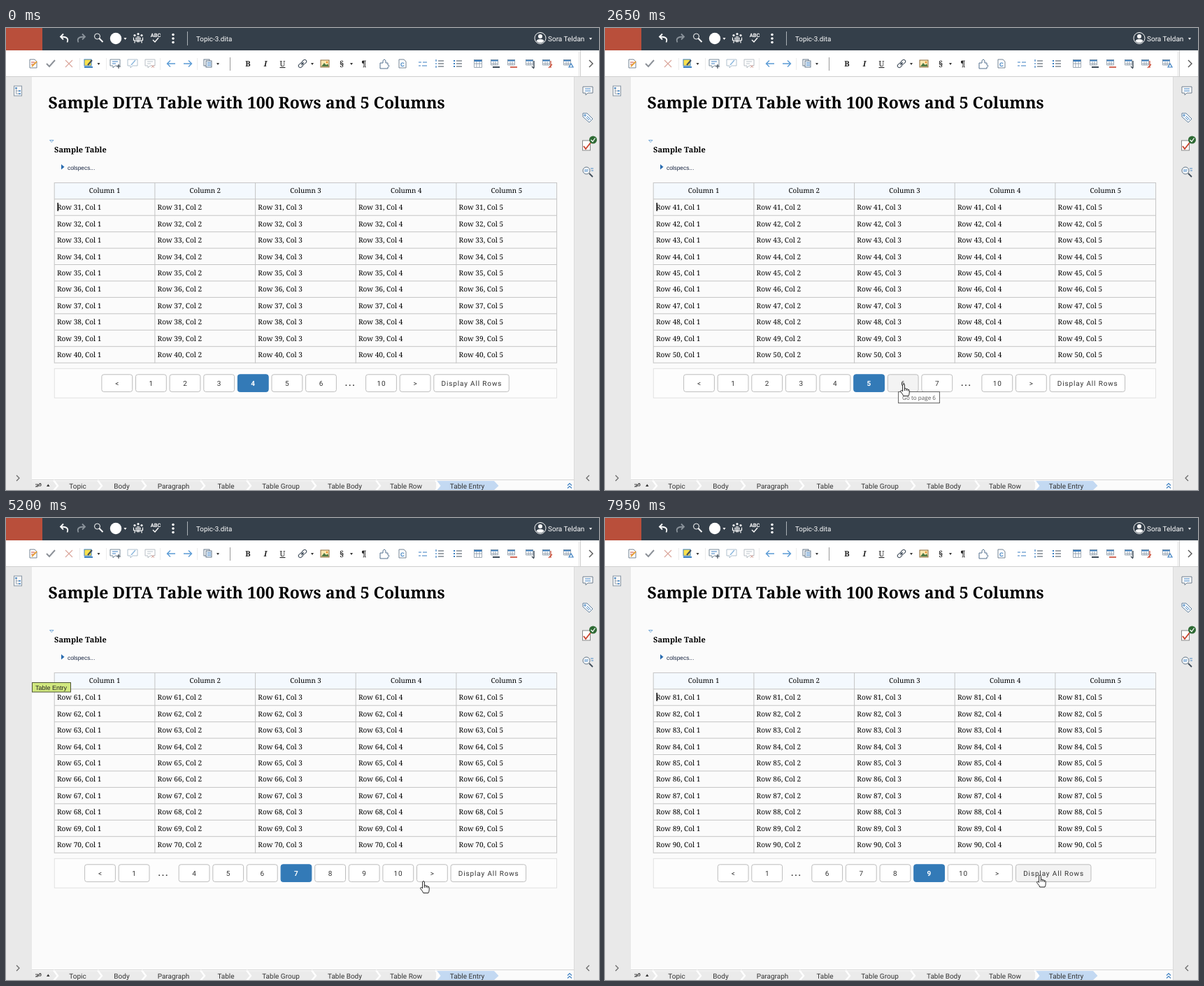
Recreate the animation shown at these times as an HTML page. Size 848 by 661 pixels, loop 8 s.

```html
<!DOCTYPE html>
<html lang="en">
<head>
<meta charset="utf-8">
<title>Paged table editor</title>
<style>
  html, body { margin: 0; width: 100%; height: 100%; overflow: hidden; background: #fbfbfb; }
  svg { display: block; width: 848px; height: 661px; }
  text { text-rendering: geometricPrecision; white-space: pre; }
  .ui { font-family: Roboto, sans-serif; font-size: 10px; }
  .serif { font-family: "Noto Serif", serif; font-size: 10.1px; }
  .arial { font-family: "Liberation Sans", sans-serif; }
  .mid { text-anchor: middle; }
  .b { font-weight: 700; }
  .btn { letter-spacing: .85px; fill: #333; }
</style>
</head>
<body>
<svg id="stage" viewBox="0 0 848 661" xmlns="http://www.w3.org/2000/svg">
  <g id="chrome"></g>
  <g id="rows" class="serif"></g>
  <path id="caret" d="M74.2 250V262" stroke="#000" stroke-width="1.4"/>
  <g id="tag">
    <rect x="37.5" y="235.5" width="55" height="13.5" fill="#d1e87f" stroke="#4d5536"/>
    <text x="42" y="245.7" class="arial" font-size="9" fill="#222">Table Entry</text>
  </g>
  <g id="pager" class="ui mid"></g>
  <g id="tip">
    <rect x=".5" y=".5" height="16" fill="#fff" stroke="#666"/>
    <text x="6" y="11.6" font-family="Open Sans, sans-serif" font-size="8.1" fill="#555"></text>
  </g>
  <circle id="halo" r="8" fill="#ecd938" fill-opacity=".78"/>
  <path id="cursor" fill="#fff" stroke="#111" stroke-width=".9" stroke-linejoin="round"/>
</svg>
<script>
const $ = id => document.getElementById(id);
const INK = '#3f4c59', BLUE = '#3b7fc1', GREY = '#c4c4c4', RED = '#c8452f';

// ---------- drawing helpers ----------
const rect = (x, y, w, h, fill, stroke = 'none', r = 0) =>
  `<rect x="${x}" y="${y}" width="${w}" height="${h}" rx="${r}" fill="${fill}" stroke="${stroke}"/>`;
const line = (d, stroke = INK, w = 1, fill = 'none') =>
  `<path d="${d}" fill="${fill}" stroke="${stroke}" stroke-width="${w}"/>`;
const solid = (d, fill = INK) => `<path d="${d}" fill="${fill}"/>`;
const disc = (x, y, r, fill, stroke = 'none') =>
  `<circle cx="${x}" cy="${y}" r="${r}" fill="${fill}" stroke="${stroke}"/>`;
const text = (x, y, s, cls = 'ui', attrs = '') =>
  `<text x="${x}" y="${y}" class="${cls}" ${attrs}>${s}</text>`;
const at = (x, y, body) => `<g transform="translate(${x} ${y})">${body}</g>`;
const drop = (x, y, fill) => solid(`M${x - 2} ${y - 1}h4l-2 3z`, fill);

// ---------- top bar ----------
function topBar() {
  const w = '#fff', undo = c => line('M4.500 6Q8-2-4-2M-1-6L-5-2L-1 2', c, 1.8);
  return rect(0, 0, 848, 32, '#343f4a') + rect(0, 0, 52, 32, '#b94f3b')
    + at(83, 14.5, undo(w))
    + `<g transform="translate(108 14.5) scale(-1 1)">${undo('#8a939b')}</g>`
    + at(132, 14, disc(-1.5, -2, 4, 'none', w) + line('M1.500 1L6.500 6', w, 2))
    + disc(157, 15, 8.2, w) + drop(170.5, 15, w)
    + at(189, 14.5, [-5, 0, 5].map(x => disc(x, x ? -4 : -6, 1.6, w)).join('')
      + line('M-6.500-1V3H-5V7M6.500-1V3H5V7M-3-1V3M3-1V3M-1-3V6M1-3V6M-4 4H4', w, 1.2))
    + text(214, 13, 'ABC', 'ui mid b', 'fill="#fff" style="font-size:7.5px"')
    + line('M210 17L213 20L218 14', w, 1.4)
    + [9.5, 15, 20.5].map(y => disc(239, y, 1.8, w)).join('')
    + line('M259.500 5V25', '#aab1b7')
    + text(272, 18.7, 'Topic-3.dita', 'ui', 'fill="#fff" style="font-size:9.8px"')
    + disc(764, 14.5, 8, 'none', w) + disc(764, 12, 3, w)
    + solid('M758.500 19Q759 16 764 16T769.500 19Q764 23.500 758.500 19', w)
    + text(775, 18.5, 'Sora Teldan', 'ui', 'fill="#fff"') + drop(836, 15, w);
}

// ---------- toolbar icons, each centred on 0,0 ----------
const bubble = (mark, c) => line('M-7-6H7V3H0L-3 6V3H-7Z', c, .9, '#fff') + mark;
const arrow = line('M6 0H-5M-1-4.500L-5.500 0L-1 4.500', '#5b9bd5', 1.4);
const pen = line('M-2 4L5-3', '#e7a13a', 2);
const sheet = line('M-5-6H2L5-3V6H-5Z', '#66788a', .9, '#fff');
const bars = line('M-2-4H6M-2 0H6M-2 4H6', INK, 1);
const table = solid('M-6-6H6V-3H-6Z', BLUE) + line('M-5.500-5.500H5.500V5.500H-5.500ZM-5.500 0H5.500M-2-3V5M2-3V5', '#8796a4', .8);
const smallTable = mark => solid('M-7-6H4V-3.500H-7Z', BLUE)
  + line('M-6.500-5.500H3.500V2H-6.500ZM-3-3V2M0-3V2M-6 0H3', '#8796a4', .8) + mark;

function toolBar() {
  const icons = [
    [39, sheet + line('M-3-2H2M-3 1H1', RED) + pen],
    [64, line('M-6 0L-2 4L6-5', '#8d9299', 2)],
    [90, line('M-5-5L5 5M5-5L-5 5', '#dba79d', 1.2)],
    [118, rect(-6, -6, 10, 9, '#fbe14c', BLUE) + line('M-1 2L5-5', INK, 2) + rect(-6, 4, 12, 2, BLUE)],
    [156, bubble(line('M-4-3H4M-4 0H1', BLUE) + line('M2 4H8M5 1V7', INK, 1.2), '#6d7f90')],
    [181, bubble(line('M-2 2L4-5', '#8eb9df', 1.5), '#a9bac9')],
    [206, bubble(line('M-4-3H4M-4 0H1', '#b9c2ca') + line('M2 2L6 6M6 2L2 6', '#dba79d'), '#b0b8c0')],
    [236, arrow], [260, `<g transform="scale(-1 1)">${arrow}</g>`],
    [289, rect(-6, -6, 8, 9, '#fff', '#66788a') + rect(-3, -4, 8, 9, '#e4eef8', '#66788a') + line('M-1-1H4M-1 2H4', BLUE)],
    [424, `<g transform="rotate(-45)">${rect(-7, -2.5, 7, 5, 'none', INK, 2.5) + rect(0, -2.5, 7, 5, 'none', INK, 2.5) + line('M-3 0H3')}</g>`],
    [456, rect(-6, -5, 12, 10, '#f9e7b0', '#8b6b3d') + solid('M-5 4L-1-1L2 2L4 0L5.500 4Z', '#4d7a45') + disc(3, -2, 1.3, '#e88a2a')],
    [541, line('M-6-1H-2V-4Q0-8 2-4V-1H5V2Q9 3 5 5V7H-6Z', '#526f8d', 1, '#fff')],
    [567, sheet + text(0, 4, 'C', 'arial mid b', `font-size="8" fill="${BLUE}"`)],
    [596, line('M-6-2H-2M0-2H6M-6 3H-3M-1 3H6', BLUE, 1.2)],
    [620, bars + line('M-5-6V-3M-5-1V1M-5 3V6', BLUE, 1.2)],
    [646, bars + [-4, 0, 4].map(y => rect(-6, y - 1, 2, 2, BLUE)).join('')],
    [675, table],
    [700, smallTable(line('M-4 5H6', INK, 2))],
    [724, smallTable(line('M-3 5H7', RED, 1.6))],
    [750, smallTable(line('M5-4V6M2 4L5 7', INK, 1.4))],
    [774, smallTable(line('M5-4V6M2 6L7 1', RED, 1.2))],
    [804, smallTable(line('M1 5L4 0L7 5Z', BLUE, 1.2, '#fff'))]
  ];
  const glyph = (x, s, extra = '') => text(x, 55, s, 'serif mid b', 'fill="#222" style="font-size:11px;' + extra + '"');
  return rect(0, 32, 848, 37.5, '#fff') + line('M0 69.500H848', '#cfcfcf')
    + icons.map(([x, body]) => at(x, 51, body)).join('')
    + glyph(346, 'B') + glyph(371, 'I', 'font-style:italic') + glyph(395.5, 'U', 'font-weight:400;text-decoration:underline')
    + glyph(480, '§') + glyph(512, '¶')
    + [132.5, 303, 438, 494].map(x => drop(x, 51, '#333')).join('')
    + [105, 143, 220, 273].map(x => line(`M${x}.5 43V60`, '#ececec')).join('')
    + line('M320.500 42V61', '#999')
    + solid('M818 33H822V69H818Z', '#f2f2f2') + line('M821.500 32V69', '#d2d2d2')
    + line('M834 46L839 51L834 56', '#555', 1.4);
}

// ---------- side panels and breadcrumb ----------
function sides() {
  const chevron = (x, s) => line(`M${x - 2 * s} 640L${x + 2 * s} 644L${x - 2 * s} 648`, '#666', 1.2);
  return rect(0, 70, 37, 591, '#e9e9e9') + rect(812, 70, 36, 591, '#e9e9e9') + line('M812.500 70V661', '#dadada')
    + at(17, 90, rect(-5.5, -7, 11, 14, '#f7f7f7', '#8796a4')
      + line('M-2.500-5V4H1M-2.500 0H1', '#8796a4', .8) + line('M-4-4H-1M1 0H4M1 4H4', BLUE, 1.6))
    + at(832, 90, bubble(line('M-4-3H4M-4 0H4', BLUE), '#5f7182'))
    + at(832, 128, line('M-7-6H-1L7 2L2 7L-7-1Z', '#5f7f9f', 1, '#fff') + disc(-4, -3, 1.2, 'none', BLUE) + line('M-1-2L4 3M-2 0L2 4', BLUE))
    + at(830, 168, rect(-5.5, -7, 11, 14, '#fff', '#888') + line('M-4 1L-1 5L6-4', RED, 1.8))
    + disc(839.5, 160, 5.5, '#2f6b35') + line('M836.500 160L839 162.500L842.500 157.500', '#fff', 1.3)
    + at(831, 205, disc(-1, -1, 5, '#fff', '#5f7182') + line('M3 3L8 8', INK, 1.8) + line('M-4-2H2M-4 0H1M5-4H9M6-1H9', BLUE, .9))
    + chevron(17, 1) + chevron(832, -1);
}

function crumbs() {
  const names = [['Topic', 102.5], ['Body', 165.5], ['Paragraph', 239.5], ['Table', 314.5],
    ['Table Group', 393], ['Table Body', 484.5], ['Table Row', 572], ['Table Entry', 659.5]];
  return rect(37, 646, 775, 15, '#fbfbfb') + line('M37 646.500H812', '#d5d5d5')
    + rect(37, 648, 578, 13, '#ebebeb')
    + solid('M614 648H698L704.500 655L698 661H614L620.500 655Z', '#c3d9f2')
    + [68, 131, 194, 278, 344, 437, 529, 614].map(x => line(`M${x} 647L${x + 6} 655L${x} 662`, '#fff', 2.4)).join('')
    + line('M42 656.500L50 651.500M42 653H46V656H43M47 652H50V655H47', '#444', 1)
    + solid('M58 656H62.500L60.300 652.500Z', '#333')
    + names.map(([s, x]) => text(x, 658.5, s, 'ui mid', 'fill="#333"')).join('')
    + line('M803 654.500L806 651.500L809 654.500M803 658.500L806 655.500L809 658.500', BLUE, 1.1);
}

// ---------- document ----------
const LEFT = 69.2, COL = 143.68, BODY = 244.8, ROW = 23.43;
function sheetArea() {
  const right = LEFT + COL * 5;
  let s = text(60.5, 115, 'Sample DITA Table with 100 Rows and 5 Columns', 'serif b', 'style="font-size:23px"')
    + line('M62.500 160.500H68L65.200 163.500Z', '#77a9d6', 1, '#fff')
    + text(69, 178, 'Sample Table', 'serif b', 'style="font-size:11px"')
    + solid('M79 195L83.500 198.700L79 202.500Z', '#2a6cb0')
    + text(88, 202.7, 'colspecs...', 'arial', 'font-size="8.3" fill="#16233f"')
    + rect(LEFT, 221.5, COL * 5, 23.3, '#f4f9fe');
  let grid = '';
  for (let i = -1; i <= 10; i++) grid += `M${LEFT} ${(BODY + i * ROW).toFixed(1)}H${right}`;
  for (let c = 0; c <= 5; c++) grid += `M${(LEFT + c * COL).toFixed(1)} 221V479.500`;
  s += line(grid, GREY);
  for (let c = 0; c < 5; c++) s += text(LEFT + COL * (c + .5) + .1, 236.3, 'Column ' + (c + 1), 'serif mid', 'style="font-size:9.8px"');
  return s + rect(69.3, 487.3, 718.2, 41.9, '#fdfdfd', '#e1e1e1');
}

$('chrome').innerHTML = rect(0, 0, 848, 661, '#fbfbfb') + sheetArea() + sides() + crumbs() + topBar() + toolBar();

function drawRows(page) {
  let s = '';
  for (let r = 0; r < 10; r++)
    for (let c = 0; c < 5; c++)
      s += text((LEFT + 3.7 + c * COL).toFixed(1), (260.2 + r * ROW).toFixed(1),
        `Row ${(page - 1) * 10 + r + 1}, Col ${c + 1}`, '');
  $('rows').innerHTML = s;
}

// ---------- pager ----------
const STEP = 48.6, GAP = 37.4, WIDE = 108.5;
function layout(page) {
  const items = ['&lt;'];
  let last = 0;
  for (let n = 1; n <= 10; n++) {
    if (n > 1 && n < 10 && (n < page - 3 || n > page + 2)) continue;
    if (n - last > 1) items.push('...');
    items.push(n);
    last = n;
  }
  items.push('&gt;', 'Display All Rows');
  const size = k => k === '...' ? GAP : k === 'Display All Rows' ? WIDE : STEP;
  let x = 428.1 - items.reduce((sum, k) => sum + size(k), 0) / 2;
  return items.map(key => {
    const w = size(key), box = { key, x, w: w === STEP ? 44.8 : w };
    x += w;
    return box;
  });
}

const hit = (boxes, x, y) => y < 496 || y > 519 ? null
  : boxes.find(b => b.key !== '...' && x >= b.x && x <= b.x + b.w);

function drawPager(boxes, page, hover, pressed) {
  $('pager').innerHTML = boxes.map(b => {
    if (b.key === '...')
      return text(b.x + 16, 512, '...', 'b', 'fill="#333" style="font-size:12px;letter-spacing:1.8px"');
    const on = b.key === page, over = hover === b;
    let fill = '#fff', edge = '#bdbdbd';
    if (on) fill = edge = over ? '#286090' : '#337ab7';
    else if (over && pressed) { fill = '#c2dcf3'; edge = '#3c80c2'; }
    else if (over) fill = '#f3f3f3';
    return rect((b.x + .5).toFixed(1), 495.8, (b.w - 1).toFixed(1), 24.6, fill, edge, 3)
      + text((b.x + b.w / 2 + .4).toFixed(1), 511.7, b.key, on ? 'btn b' : 'btn', on ? 'style="fill:#fff"' : '');
  }).join('');
}

// ---------- timeline ----------
const LOOP = 8000;
const turns = [[0, 4], [1560, 5], [2910, 6], [4340, 7], [5590, 8], [6910, 9]];
const presses = [[1500, 1560], [2850, 2910], [4280, 4340], [5530, 5590], [6850, 6910]];
const tags = [[1630, 2630], [3010, 4030], [4500, 5510], [5710, 6700], [7030, 7950]];
const caretOff = [[260, 1560], [2090, 2610], [3510, 4030], [4840, 5360], [6110, 6640], [7430, 7950]];
const tips = [[2600, 2850, 'Go to page 6', 59], [3690, 4280, 'Go to page 7', 59], [6110, 6850, 'Go to next page', 73]];
const path = [[400, 513, 41], [550, 379, 521.5], [800, 379, 521.5], [930, 371, 513], [1160, 406, 510],
  [1910, 406, 510], [2090, 427, 510], [3510, 427, 510], [3690, 440, 510], [4810, 440, 510],
  [5200, 597, 520], [5400, 604, 510], [7370, 604, 510], [7580, 622, 511.5]];
const HAND = 'M-1.400 1A1.400 1.400 0 0 1 1.400 1V6Q3.600 4.800 3.900 6.600Q5.800 5.600 6.200 7.400Q8.200 6.800 8.200 8.800V12Q8.200 14 7 16.500H-.2Q-1 14-3.800 11Q-5.200 9-3.600 8.500Q-2.600 8.200-1.400 10ZM1.400 6V9M3.900 6.600V9M6.200 7.400V9.500';
const ARROW = 'M0 0V15L3.500 11.700L5.800 17L8 16L5.700 11H10.500Z';

const during = (spans, t) => spans.find(([a, b]) => t >= a && t < b);
const show = (el, on) => el.setAttribute('visibility', on ? 'visible' : 'hidden');
const move = (el, x, y) => el.setAttribute('transform', `translate(${x.toFixed(1)} ${y.toFixed(1)})`);

function pointer(t) {
  const i = path.findIndex(k => k[0] > t);
  if (i < 0) return path[path.length - 1].slice(1);
  if (i === 0) return path[0].slice(1);
  const [t0, x0, y0] = path[i - 1], [t1, x1, y1] = path[i];
  const u = (t - t0) / (t1 - t0), e = u * u * (3 - 2 * u);
  return [x0 + (x1 - x0) * e, y0 + (y1 - y0) * e];
}

let shownPage = 0, shownState = '', boxes = [];
function render(t) {
  const page = turns.filter(k => k[0] <= t).pop()[1];
  if (page !== shownPage) {
    shownPage = page;
    boxes = layout(page);
    drawRows(page);
  }
  const [x, y] = pointer(t), visible = t >= 400;
  const pressed = !!during(presses, t);
  const hover = visible ? hit(boxes, x, y) : null;
  const state = [page, hover && hover.key, pressed].join();
  if (state !== shownState) {
    shownState = state;
    drawPager(boxes, page, hover, pressed);
  }
  show($('caret'), !during(caretOff, t));
  show($('tag'), during(tags, t));
  show($('halo'), pressed);
  move($('halo'), x - 2, y + 1);

  const tip = during(tips, t);
  show($('tip'), tip);
  if (tip) {
    move($('tip'), Math.round(x - 8), Math.round(y + 10));
    $('tip').children[0].setAttribute('width', tip[3]);
    $('tip').children[1].textContent = tip[2];
  }
  show($('cursor'), visible);
  $('cursor').setAttribute('d', y > 495 ? HAND : ARROW);
  move($('cursor'), x, y);
}

function frame() {
  render(performance.now() % LOOP);
  requestAnimationFrame(frame);
}
frame();
</script>
</body>
</html>
```
